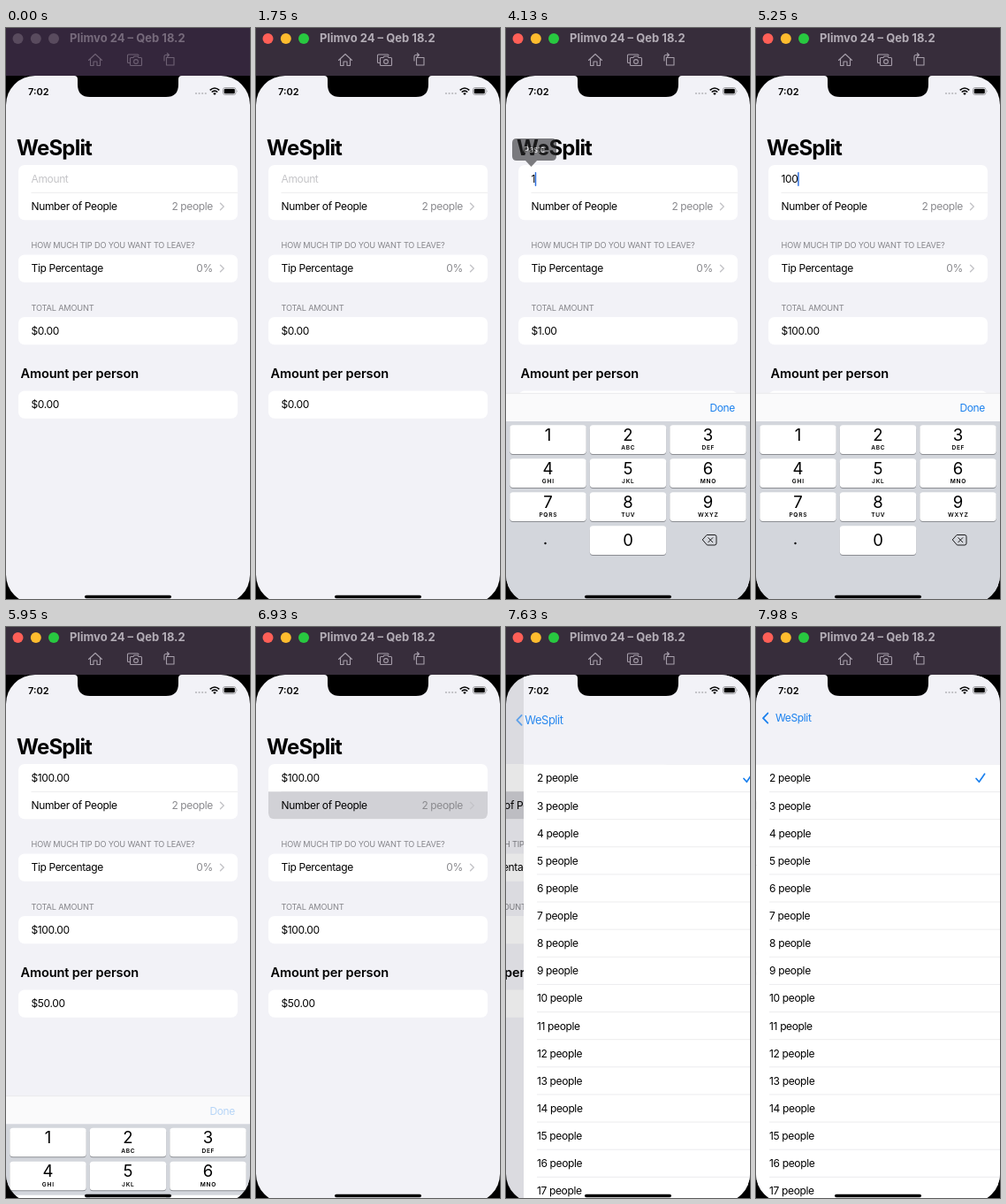
An HTML page for the animation above (8000 ms loop, 276 by 646 pixels).

```html
<!DOCTYPE html>
<html lang="en">
<head>
<meta charset="utf-8">
<title>Bill splitter demo</title>
<style>
  html, body { margin: 0; width: 100%; height: 100%; overflow: hidden; background: #000; }
  svg { display: block; width: 276px; height: 646px; }
  text { font: 12px Inter, "Liberation Sans", sans-serif; letter-spacing: -.03em; fill: #000; white-space: pre; }
  .end { text-anchor: end; }
  .mid { text-anchor: middle; }
  .grey { fill: #8a8a8e; }
  .blue { fill: #1a80ee; }
  .head { font-size: 9.2px; letter-spacing: -.018em; fill: #86868b; }
  .large { font-size: 24px; font-weight: 700; letter-spacing: -.033em; }
  .sub { font-size: 14.6px; font-weight: 600; letter-spacing: -.01em; }
  .clock { font-size: 11px; font-weight: 600; letter-spacing: 0; }
  .digit { font-size: 18.5px; letter-spacing: 0; }
  .letters { font-size: 6.6px; font-weight: 600; letter-spacing: .11em; }
  .paste { font-size: 9.6px; fill: #fff; }
  .line { stroke: #e4e4e7; stroke-width: .7; }
  .chev { fill: none; stroke: #c4c4c8; stroke-width: 1.4; stroke-linecap: round; stroke-linejoin: round; }
  .card { fill: #fff; }

  #bar > rect { fill: #372d3b; }
  #bar text { font-size: 13px; font-weight: 700; letter-spacing: 0; fill: #b3adb6; }
  #bar .icon { fill: none; stroke: #a69eaa; stroke-width: 1.1; stroke-linejoin: round; stroke-linecap: round; }
  #bar.idle > rect { fill: #34263c; }
  #bar.idle text { fill: #766a7b; }
  #bar.idle .icon { stroke: #6e6174; }
  #bar.idle circle { fill: #594b5e; }
</style>
</head>
<body>
<svg viewBox="0 0 276 646" xmlns="http://www.w3.org/2000/svg">
  <defs>
    <clipPath id="screen"><rect y="54" width="276" height="597.5" rx="33"/></clipPath>
  </defs>

  <g id="bar">
    <rect width="276" height="54"/>
    <circle cx="13.5" cy="12" r="6" fill="#fe5f57"/>
    <circle cx="33.8" cy="12" r="6" fill="#febc2e"/>
    <circle cx="54" cy="12" r="6" fill="#28c840"/>
    <text x="72" y="16.4">Plimvo 24 – Qeb 18.2</text>
    <g class="icon">
      <path d="M93.5 36.5 101 29.5 108.500 36.500M95.500 35V42.500H99V38H103V42.500H106.500V35"/>
      <path d="M139.500 39.500H138.500Q137.500 39.500 137.500 38.500V31Q137.500 30 138.500 30H149Q150 30 150 31"/>
      <path d="M141.500 33.500H144L145 32H149L150 33.500H152.500Q153.500 33.500 153.500 34.500V41.500Q153.500 42.500 152.500 42.500H141.500Q140.500 42.500 140.500 41.500V34.500Q140.500 33.500 141.500 33.500Z"/>
      <ellipse cx="147" cy="38" rx="2.4" ry="2.4"/>
      <path d="M181.500 33.500H190V42H181.500ZM179 37V32.500Q179 30.500 181 30.500H184M182.300 28.500 184.500 30.500 182.300 32.500"/>
    </g>
  </g>

  <g clip-path="url(#screen)">
    <rect y="54" width="276" height="600" fill="#f2f2f7"/>

    <g id="form">
      <rect class="card" x="14" y="155" width="248" height="62.300" rx="7"/>
      <line class="line" x1="28.500" x2="262" y1="186.300" y2="186.300"/>
      <path id="pick" d="M14 186.200H262V210.300Q262 217.300 255 217.300H21Q14 217.300 14 210.300Z" fill="#d1d1d6"/>
      <text id="field" x="28.500" y="175.400"></text>
      <rect id="caret" y="163" width="1.500" height="16" rx=".7" fill="#2f70df"/>
      <text x="28.500" y="206.400">Number of People</text>
      <text class="grey end" x="234" y="206.400">2 people</text>
      <path class="chev" d="M242.500 198.300 246.300 202 242.500 205.700"/>

      <text class="head" x="28.500" y="249.400">HOW MUCH TIP DO YOU WANT TO LEAVE?</text>
      <rect class="card" x="14" y="256.500" width="248" height="31.200" rx="7"/>
      <text x="28.500" y="276.400">Tip Percentage</text>
      <text class="grey end" x="234" y="276.400">0%</text>
      <path class="chev" d="M242.500 268.300 246.300 272 242.500 275.700"/>

      <text class="head" x="28.500" y="319.700">TOTAL AMOUNT</text>
      <rect class="card" x="14" y="327" width="248" height="31.200" rx="7"/>
      <text id="total" x="28.500" y="346.800"></text>

      <text class="sub" x="16.500" y="396.300">Amount per person</text>
      <rect class="card" x="14" y="410.500" width="248" height="31.200" rx="7"/>
      <text id="share" x="28.500" y="430.400"></text>
    </g>
    <rect id="dim" y="54" width="276" height="600"/>

    <g id="list">
      <rect y="54" width="276" height="101.500" fill="#f2f2f7"/>
      <rect class="card" y="155.500" width="276" height="500"/>
      <path d="M249 171.500 252.300 175.300 258.500 166.200" fill="none" stroke="#1a80ee" stroke-width="1.700" stroke-linecap="round" stroke-linejoin="round"/>
    </g>

    <g id="title"><text class="large" y="8.700">WeSplit</text></g>
    <g id="back"><text class="blue" y="4.400">WeSplit</text></g>
    <path id="arrow" d="M13.300 97.500 8 103 13.300 108.500" fill="none" stroke="#1a80ee" stroke-width="1.800" stroke-linecap="round" stroke-linejoin="round"/>

    <g id="menu">
      <path d="M12 125H52Q57 125 57 130V145Q57 150 52 150H35L28.500 157 22 150H12Q7 150 7 145V130Q7 125 12 125Z" fill="#2c2c2e"/>
      <text class="paste mid" x="32" y="141.300">Paste</text>
    </g>

    <g id="keyboard">
      <rect y="413" width="276" height="32" fill="#fafafb"/>
      <line class="line" x2="276" y1="413.300" y2="413.300"/>
      <text id="done" class="blue end" x="259" y="434.400">Done</text>
      <rect y="445" width="276" height="210" fill="#d3d6dc"/>
      <circle cx="44.500" cy="583" r="1.200"/>
      <path d="M227.500 573.500H236Q238 573.500 238 575.500V583Q238 585 236 585H227.500L222.500 579.250ZM228.800 576.700 233.800 581.800M233.800 576.700 228.800 581.800" fill="none" stroke="#1c1c1e" stroke-linejoin="round" stroke-linecap="round"/>
    </g>

    <g id="status">
      <path d="M77 54Q81 54 81 58V64Q81 78 95 78H181Q195 78 195 64V58Q195 54 199 54Z"/>
      <text class="clock" x="25" y="75.700">7:02</text>
      <g fill="#b9b9be">
        <circle cx="215" cy="74" r="1.100"/><circle cx="218.600" cy="74" r="1.100"/>
        <circle cx="222.200" cy="74" r="1.100"/><circle cx="225.800" cy="74" r="1.100"/>
      </g>
      <g fill="none" stroke="#000" stroke-width="1.600">
        <path d="M230.700 70.300Q236 65.700 241.300 70.300M232.700 72.500Q236 69.700 239.300 72.500"/>
      </g>
      <path d="M234.200 74Q236 72.700 237.800 74L236 76Z"/>
      <rect x="245.500" y="67.500" width="14.500" height="8" rx="2.300" fill="none" stroke="#8d8d91" stroke-width=".8"/>
      <rect x="246.700" y="68.700" width="12.100" height="5.600" rx="1.300"/>
      <path d="M261 70.200Q262.300 71.500 261 72.800Z" fill="#8d8d91"/>
      <rect x="89" y="641.800" width="98" height="3.500" rx="1.750"/>
    </g>
  </g>
</svg>

<script>
const LOOP = 8000, STEP = 70, WIDTH = 276;
const $ = id => document.getElementById(id);

function add(parent, tag, attrs, text = '') {
  const el = document.createElementNS('http://www.w3.org/2000/svg', tag);
  for (const key in attrs) el.setAttribute(key, attrs[key]);
  el.textContent = text;
  parent.append(el);
  return el;
}

// Number pad
const keys = {};
const letters = ['', 'ABC', 'DEF', 'GHI', 'JKL', 'MNO', 'PQRS', 'TUV', 'WXYZ'];
function addKey(digit, col, row, label) {
  const x = 4.3 + col * 90.5, y = 449.3 + row * 38, mid = x + 43.2;
  add($('keyboard'), 'rect', { x, y: y + 1, width: 86.4, height: 32.6, rx: 3.6, fill: '#8b8d92' });
  keys[digit] = add($('keyboard'), 'rect', { x, y, width: 86.4, height: 32.6, rx: 3.6 });
  add($('keyboard'), 'text', { class: 'digit mid', x: mid, y: y + (digit ? 17.8 : 23) }, digit);
  add($('keyboard'), 'text', { class: 'letters mid', x: mid + .3, y: y + 28 }, label);
}
letters.forEach((label, i) => addKey(i + 1, i % 3, Math.floor(i / 3), label));
addKey(0, 1, 3, '');

// People list
for (let n = 2; n < 18; n++) {
  const y = 171 + (n - 2) * 31.13;
  add($('list'), 'text', { x: 15, y: y + 4.4 }, n + ' people');
  add($('list'), 'line', { class: 'line', x1: 15, x2: WIDTH, y1: y + 15.5, y2: y + 15.5 });
}

// Critically damped spring: distance left, from 1 to 0
function spring(ms, speed = 18.26) {
  const x = Math.max(0, ms) / 1000 * speed;
  return (1 + x) * Math.exp(-x);
}

// Linear interpolation through [time, value] points
function track(t, points) {
  const i = points.findIndex(p => p[0] > t);
  if (i < 0) return points[points.length - 1][1];
  if (!i) return points[0][1];
  const [t0, a] = points[i - 1], [t1, b] = points[i];
  return a + (b - a) * (t - t0) / (t1 - t0);
}

const between = (t, a, b) => t >= a && t < b;
const money = n => '$' + n.toFixed(2);
const move = (id, x, y = 0, scale = 1) =>
  $(id).setAttribute('transform', `translate(${x} ${y}) scale(${scale})`);
const fade = (id, value) => $(id).setAttribute('opacity', value);

const blink = [[2730, 1], [2870, 0], [3080, 0], [3290, 1], [5250, 1], [5460, 0], [5600, 0], [5740, 1]];
const popup = [[2450, 0], [2520, .27], [2660, 1], [3990, 1], [4060, .85], [4130, .6], [4270, 0]];

function render(t) {
  $('bar').setAttribute('class', t < 490 ? 'idle' : '');

  // Amount entry
  const typed = t < 4060 ? '' : t < 4550 ? '1' : t < 4760 ? '10' : '100';
  const total = Number(typed), editing = between(t, 2100, 5880);
  const field = $('field');
  field.textContent = !typed ? 'Amount' : editing ? typed : money(total);
  field.style.fill = typed ? '#000' : '#c5c5c8';
  $('total').textContent = money(total);
  $('share').textContent = money(total / 2);
  $('caret').setAttribute('x', 28.2 + (typed ? field.getComputedTextLength() : 0));
  fade('caret', editing ? track(t, blink) : 0);
  fade('menu', track(t, popup));

  // Keyboard
  const hidden = t < 5860 ? spring(t - 2060, 40) : 1 - spring(t - 5860);
  move('keyboard', 0, 240 * hidden);
  const down = { 1: between(t, 3780, 3920), 0: between(t, 4480, 4550) || between(t, 4690, 4760) };
  for (const k in keys) keys[k].setAttribute('fill', down[k] ? '#b3b8c1' : '#fff');
  fade('done', track(t, [[5600, 1], [5740, .3]]));

  // Push to the people list
  const left = spring(t - 7395), done = 1 - left;
  fade('pick', track(t, [[6790, 0], [6930, 1]]));
  move('form', -.3 * WIDTH * done);
  fade('dim', .1 * done);
  move('list', WIDTH * left);
  move('title', 12 + 10 * done, 135 - 32 * done, 1 - done / 2);
  fade('title', Math.max(0, 1 - done * 1.3));
  move('back', 22 - 10 * left, 103 + 32 * left, 1 + left);
  fade('back', done);
  move('arrow', 60 * left, 32 * left);
  fade('arrow', Math.max(0, 1 - left * 5));
}

const start = performance.now();
function tick() {
  const t = (performance.now() - start) % LOOP;
  render(Math.floor((t + 8) / STEP) * STEP);
  requestAnimationFrame(tick);
}
tick();
</script>
</body>
</html>
```
